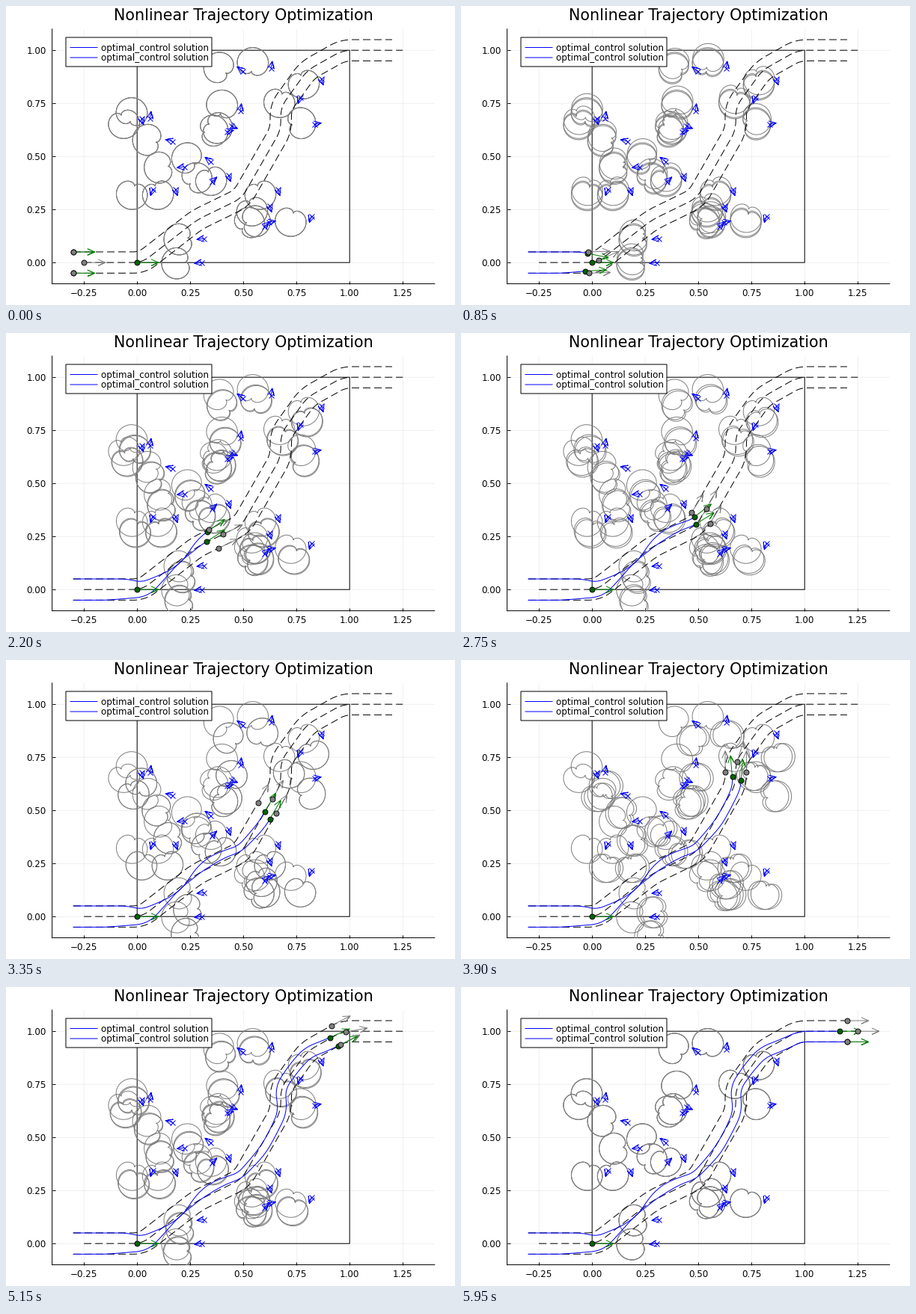
Animation, 600 px wide and 400 px high, one loop 6 s. Source, as a matplotlib script:

```python
import numpy as np
import matplotlib.pyplot as plt
from matplotlib.animation import FuncAnimation
from matplotlib.patches import Rectangle

W, H, DPI = 600, 400, 100
FRAMES, STEP = 120, 50
PX = 72 / DPI            # one pixel in points
UNIT = 284               # pixels per data unit
X0, Y0 = 175.2, 343.2    # pixel place of the data origin
GAP = .05                # formation spacing
SUB = 4                  # trail samples per frame

plt.rcParams["font.family"] = "DejaVu Sans"
plt.rcParams["path.snap"] = False

# obstacles grouped by heading in degrees
OBSTACLES = {
    188: [(.22, .451), (.313, .113), (.302, 0)],
    165: [(.165, .571)],
    142: [(.345, .476), (.496, .902)],
    80: [(.06, .68), (.63, .916), (.485, .716)],
    42: [(.351, .381), (.598, .17)],
    10: [(.422, .617), (.834, .652), (.62, .19)],
    -25: [(.443, .645)],
    -72: [(.02, .68), (.43, .412), (.18, .346), (.866, .867), (.662, .346), (.623, .268)],
    -107: [(.073, .346), (.767, .779), (.82, .219)],
}
SPOTS = [(np.array(p), np.radians(deg)) for deg, group in OBSTACLES.items() for p in group]

# corners of the leader's route, with a run-up before its start
ROUTE = [(-.35, 0), (.024, 0), (.28, .2), (.492, .303), (.676, .623),
         (.676, .732), (.80, .905), (.968, 1), (1.25, 1)]
START = .1

# sideways drift of each agent: (frame, offset from the route)
DRIFT_1 = [(13, .05), (32, -.01), (46, .046), (67, 0), (88, .03), (108, 0)]
DRIFT_2 = [(8, -.05), (20, -.039), (37, -.006), (50, .01), (67, -.037), (87, -.02), (105, -.05)]


def direction(angle):
    return np.stack([np.cos(angle), np.sin(angle)], axis=-1)


def rounded(points, cut=.045):
    """Polyline with its corners replaced by quadratic curves."""
    p = np.array(points, float)
    t = np.linspace(0, 1, 30)[:, None]
    out = [p[:1]]
    for a, b, c in zip(p, p[1:], p[2:]):
        e, f = (b + cut * (q - b) / np.hypot(*(q - b)) for q in (a, c))
        out.append((1 - t) ** 2 * e + 2 * t * (1 - t) * b + t ** 2 * f)
    return np.vstack(out + [p[-1:]])


def headings(path):
    d = np.gradient(path, axis=0)
    return np.arctan2(d[:, 1], d[:, 0])


curve = rounded(ROUTE)
mile = np.r_[0, np.cumsum(np.hypot(*np.diff(curve, axis=0).T))]
END = mile[-1]
S = np.linspace(0, END, 3000)
RAIL = np.column_stack([np.interp(S, mile, curve[:, k]) for k in (0, 1)])
TURN = headings(RAIL)


def place(s, side=0):
    """Point at arc length s, shifted sideways to the left."""
    turn = np.interp(s, S, TURN)
    pos = np.column_stack([np.interp(s, S, RAIL[:, k]) for k in (0, 1)])
    return pos + np.reshape(side, (-1, 1)) * direction(turn + np.pi / 2)


def ease(keys, t):
    """Cosine easing from key to key, held at both ends."""
    kt, kv = np.array(keys, float).T
    i = np.clip(np.searchsorted(kt, t, "right") - 1, 0, len(kt) - 2)
    u = np.clip((t - kt[i]) / (kt[i + 1] - kt[i]), 0, 1)
    return kv[i] + (kv[i + 1] - kv[i]) * (1 - np.cos(np.pi * u)) / 2


def join(parts):
    gap = np.full((1, 2), np.nan)
    return np.vstack([q for p in parts for q in (p, gap)])


def arrow(pos, angle, length=.1, head=10, spread=.42):
    """Shaft and open head as one stroke."""
    tip = pos + length * direction(angle)
    a, b = (tip - head / UNIT * direction(angle + s) for s in (spread, -spread))
    return np.array([pos, tip, a, tip, b])


TH = np.linspace(-np.pi, np.pi, 73)
HEART = .0565 * (1 + np.cos(TH))[:, None] * direction(TH) - (.016, 0)


def hearts(psi):
    """Obstacle outlines as met by an agent with heading psi."""
    parts = []
    for p, a in SPOTS:
        axes = np.array([direction(a), direction(a + np.pi / 2)])
        parts.append(HEART @ axes + p - .09 * direction(psi))
    return join(parts)


clock = np.linspace(0, FRAMES - 1, SUB * (FRAMES - 1) + 1)
u = clock / clock[-1]
lead = START + u * (END - START)

refs = [place(lead - GAP, GAP), place(lead - GAP, -GAP), place(lead)]
trails = [place(lead - GAP - .035 * u, ease(DRIFT_1, clock)),
          place(lead - GAP - .038 * np.sin(np.pi * u), ease(DRIFT_2, clock))]
ref_psi = [headings(p) for p in refs]
trail_psi = [headings(p) for p in trails]

fig = plt.figure(figsize=(W / DPI, H / DPI), dpi=DPI, facecolor="white")
left, right = X0 - .4 * UNIT, X0 + 1.4 * UNIT
top, bottom = Y0 - 1.1 * UNIT, Y0 + .1 * UNIT
ax = fig.add_axes([left / W, 1 - bottom / H, (right - left) / W, (bottom - top) / H])
ax.set_xlim(-.4, 1.4)
ax.set_ylim(-.1, 1.1)
ax.spines[["top", "right"]].set_visible(False)
ax.spines[["left", "bottom"]].set_linewidth(PX)
ax.set_xticks(np.arange(-.25, 1.3, .25))
ax.set_yticks(np.arange(0, 1.1, .25))
ax.xaxis.set_major_formatter(lambda v, _: f"{v:.2f}".replace("-", "\u2212"))
ax.yaxis.set_major_formatter("{x:.2f}")
ax.tick_params(direction="in", length=4 * PX, width=PX, labelsize=11.84 * PX)
ax.tick_params(axis="x", pad=6.5 * PX)
ax.tick_params(axis="y", pad=8 * PX)
ax.grid(color="black", alpha=.1, lw=.6 * PX)
ax.set_axisbelow(True)


def label(x, y, text, size, **kw):
    fig.text(x / W, 1 - y / H, text, fontsize=size * PX, va="baseline", zorder=30, **kw)


def data(x, y):
    return (x - X0) / UNIT, (Y0 - y) / UNIT


def stroke(color, z, pts=((0, 0),), **kw):
    line, = ax.plot(*np.asarray(pts).T, color=color, lw=PX, zorder=z, **kw)
    return line


def dot(color, z):
    return stroke("black", z, ls="none", marker="o", ms=7 * PX, mfc=color, mew=.9 * PX)


label(317.6, 18.9, "Nonlinear Trajectory Optimization", 20.65, ha="center")

# fixed parts
stroke("black", 2.5, [(0, 0), (1, 0), (1, 1), (0, 1), (0, 0)])
for back, side in ((GAP, GAP), (GAP, -GAP), (0, 0)):
    stroke("black", 4, place(np.linspace(START, END, 800) - back, side), dashes=(10, 5))
stroke("gray", 3, hearts(0))
stroke("blue", 8, [p for p, _ in SPOTS], ls="none", marker="x", ms=7 * PX, mew=PX)
stroke("blue", 8, join([arrow(p, a, .032) for p, a in SPOTS]))

# moving parts
outlines = [stroke("gray", 3) for _ in trails]
lines = [stroke("blue", 5) for _ in trails]
ref_dots, ref_arrows = dot("gray", 7), stroke("gray", 6)
dots, arrows = dot("darkgreen", 6.6), stroke("green", 6.5)

# legend
ax.add_patch(Rectangle(data(80, 81), 195 / UNIT, 39 / UNIT,
                       fc="white", ec="black", lw=PX, zorder=20))
for y in (55.5, 69):
    stroke("blue", 21, [data(86, y), data(122, y)])
    label(126.9, y + 4.5, "optimal_control solution", 11.84)


def draw(i):
    k = SUB * i
    pos = [t[k] for t in trails] + [np.zeros(2)]
    psi = [p[k] for p in trail_psi] + [0]
    for n, trail in enumerate(trails):
        outlines[n].set_data(*hearts(psi[n]).T)
        lines[n].set_data(*trail[:k + 1].T)
    dots.set_data(*np.array(pos).T)
    arrows.set_data(*join([arrow(p, a) for p, a in zip(pos, psi)]).T)
    here = [r[k] for r in refs]
    ref_dots.set_data(*np.array(here).T)
    ref_arrows.set_data(*join([arrow(p, a[k]) for p, a in zip(here, ref_psi)]).T)
    return outlines + lines + [ref_dots, ref_arrows, dots, arrows]


anim = FuncAnimation(fig, draw, frames=FRAMES, interval=STEP, repeat=True,
                     repeat_delay=0, blit=False)
plt.show()
```
